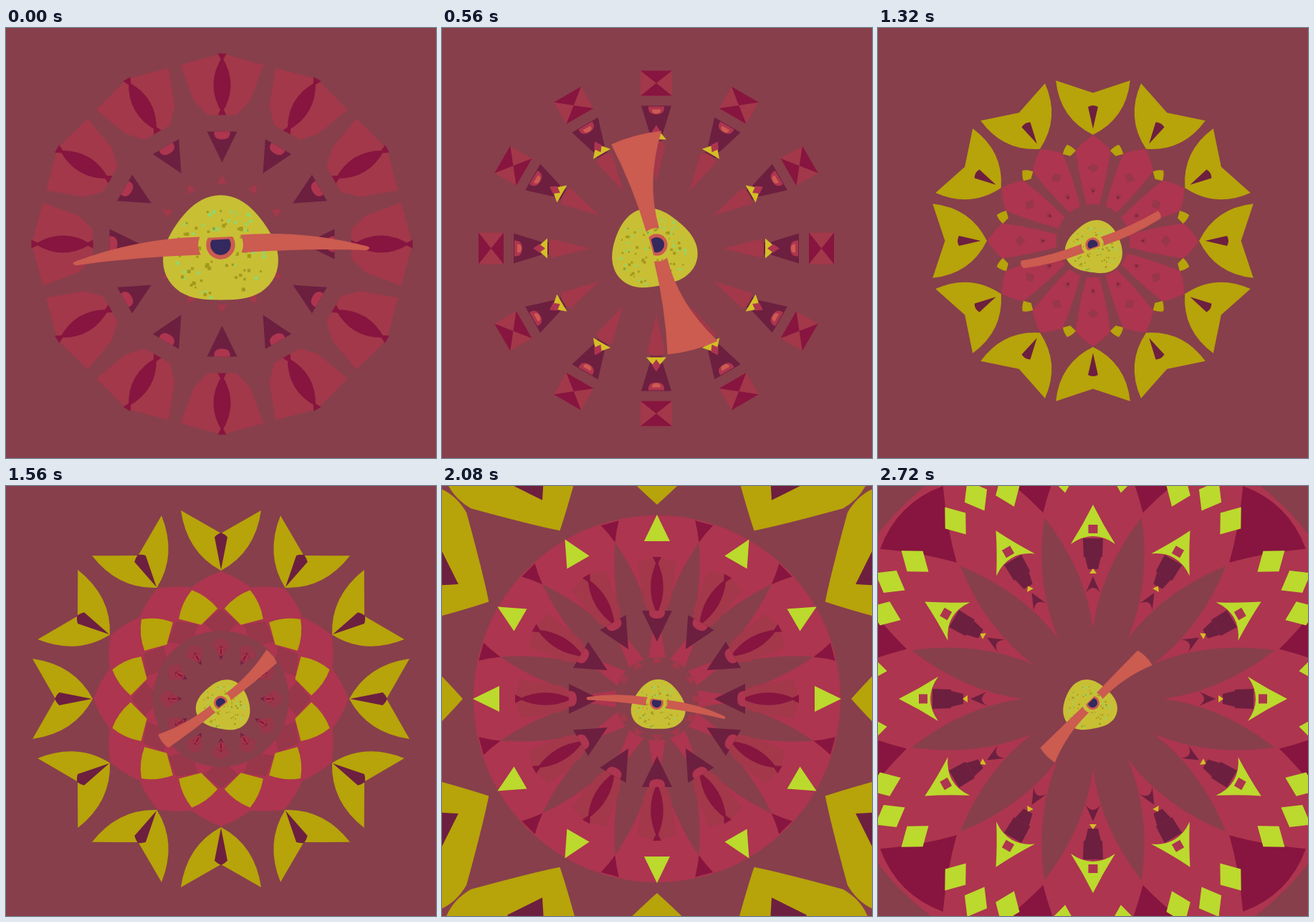
An HTML page with a canvas that plays this animation: 600 px wide and 600 px high, repeating every 2.76 s.

```html
<!DOCTYPE html>
<html lang="en">
<head>
<meta charset="utf-8">
<style>
html, body { margin: 0; width: 100%; height: 100%; overflow: hidden; background: #873f4b; }
canvas { display: block; width: 600px; height: 600px; }
</style>
</head>
<body>
<canvas id="stage" width="600" height="600"></canvas>
<script>
const ctx = document.getElementById('stage').getContext('2d');
const LOOP = 2760, STEP = 40, TAU = Math.PI * 2, DEG = Math.PI / 180;
const BEATS = [0, 560, 1040, 1560, 2080, 2400, 2720];
const C = {
  bg: '#873f4b', rose: '#a2384a', pink: '#ad354f', dusk: '#98364a', wine: '#87153f', plum: '#6d1f40',
  olive: '#b7a30a', gold: '#d3bf25', lime: '#bcd92d', coral: '#cc5b50', navy: '#33295e',
  body: '#c8bf35', moss: '#a39a1c', mint: '#92d66c'
};

let now = 0, center = [300, 297], lens = { pivot: 0, zoom: 1 };

const lerp = (a, b, k) => a + (b - a) * k;
const phase = (from, to) => Math.min(1, Math.max(0, (now - from) / (to - from)));
const hump = (from, top, to) => phase(from, top) * (1 - phase(top, to));
// Value passing through one key point per beat, starting at the given beat.
const beat = (first, ...values) => values.reduce((value, next, i) =>
  i ? lerp(value, next, phase(BEATS[first + i - 1], BEATS[first + i])) : next);

// Scales everything drawn inside around a point on the wedge axis.
function grow(pivot, zoom, drawInside) {
  if (zoom <= 0) return;
  const outer = lens;
  lens = { pivot, zoom };
  drawInside();
  lens = outer;
}

// Half outline of (side, radius) points, alternating anchors and controls, repeated in 12 wedges.
function paint(color, turn, half) {
  const right = half.map(([x, r]) => [x, -r]);
  const left = right.slice(0, -1).reverse().map(([x, y]) => [-x, y]);
  const pts = [...right, ...left];
  ctx.fillStyle = color;
  for (let k = 0; k < 12; k++) {
    ctx.save();
    ctx.translate(...center);
    ctx.rotate((k * 30 + turn) * DEG);
    ctx.translate(0, -lens.pivot);
    ctx.scale(lens.zoom, lens.zoom);
    ctx.translate(0, lens.pivot);
    ctx.beginPath();
    ctx.moveTo(...pts[0]);
    for (let i = 1; i + 1 < pts.length; i += 2) ctx.quadraticCurveTo(...pts[i], ...pts[i + 1]);
    ctx.fill();
    ctx.restore();
  }
}

function poly(color, half, turn = 0) {
  paint(color, turn, half.flatMap((p, i) => {
    const q = half[i + 1];
    return q ? [p, [(p[0] + q[0]) / 2, (p[1] + q[1]) / 2]] : [p];
  }));
}
const tri = (color, base, apex, half, dent = 0, bend = 0, turn = 0) => paint(color, turn,
  [[0, apex], [half * (0.5 + bend), (apex + base) / 2], [half, base], [half / 2, base + dent], [0, base + dent]]);
const kite = (color, inner, outer, half, waist, turn = 0, bulge = 0) => paint(color, turn,
  [[0, outer], [half * (0.5 + bulge), (outer + waist) / 2 + bulge * half], [half, waist],
   [half / 2, (inner + waist) / 2], [0, inner]]);
const block = (color, inner, outer, wIn, wOut) =>
  poly(color, [[0, outer], [wOut, outer], [wIn, inner], [0, inner]]);
const leaf = (color, inner, outer, half) =>
  paint(color, 0, [[0, outer], [half * 2, (inner + outer) / 2], [0, inner]]);
const dome = (color, r, size) =>
  paint(color, 0, [[0, r], [size / 2, r], [size, r], [size * 1.1, r - size], [0, r - size]]);

// Petals fold into squares while the triangles below open into fans.
function bloom(fold, inset, girth) {
  const m = (a, b) => lerp(a, b, fold);
  const open = 1 - fold;
  const far = inset * (1 + open);
  const outer = m(266, 248) - far, inner = m(180, 213) - far + 6 * open * (1 - girth);
  const half = m(58 * girth, 22), mid = (outer + inner) / 2;
  poly(C.rose, [[0, outer], [half, outer - 16 * girth * open], [half * m(0.68, 1), inner + 20 * open],
    [half * m(0.35, 0.9), inner], [0, inner]]);
  leaf(C.wine, lerp(mid, inner + 3, open), lerp(mid, outer - 5, open), 6 * (1 + girth) * open);
  tri(C.wine, outer, m(outer - 12, mid), m(6, 22));
  tri(C.wine, inner, m(inner + 12, mid), m(6, 22));

  const fanTop = m(157, 199) - inset;
  kite(C.rose, m(84, 92) - inset, m(96, 152) - inset, m(7, 13), m(84, 146) - inset);
  block(C.plum, m(114, 160) - inset, fanTop, m(0, 9), 21);
  dome(C.pink, fanTop - fold, 11);
  grow(fanTop - 6, fold, () => dome(C.coral, fanTop - 5, 6));
  grow(160 - inset, fold, () => {
    tri(C.plum, 150 - inset, 164 - inset, 9);
    tri(C.gold, 152 - inset, 168 - inset, 14);
    kite(C.pink, 155 - inset, 172 - inset, 6, 163 - inset);
  });
}

// Small triangles that widen into one round field.
function field() {
  const r = beat(2, 112, 178, 256, 375, 378);
  const spread = beat(2, 5.5, 15.6, 15.6) * DEG, tuck = beat(2, 0.84, 0.9, 1);
  const inner = lerp(92, 0, phase(1040, 1400));
  const x = r * tuck * Math.sin(spread), y = r * tuck * Math.cos(spread);
  grow(102, phase(600, 1040), () => paint(C.pink, 0,
    [[0, r], [r * Math.tan(spread / 2), r * (1 + tuck) / 2], [x, y], [x * 0.7, (y + inner) / 2], [0, inner]]));
}

function cutouts() {
  ctx.fillStyle = C.bg;
  ctx.beginPath();
  ctx.arc(...center, beat(2, 0, 95, 58, 75, 90), 0, TAU);
  ctx.fill();
  const tip = beat(3, 110, 226, 256, 262), w = beat(3, 0, 26, 37);
  paint(C.bg, 15, [[0, tip], [w, tip * 0.67], [w * 0.67, 90], [w * 0.33, 70], [0, 50]]);
  const rim = beat(3, 200, 254, 342, 358);
  tri(C.wine, rim, beat(3, 200, 226, 262, 269), beat(3, 0, 13, 44, 62), rim * 0.04 * phase(2080, 2400), -0.1, 15);
}

function blossoms() {
  const apex = beat(2, 112, 179, 271, 430), corner = beat(2, 178, 263, 360, 560);
  const top = beat(2, 178, 231, 520, 720), half = beat(2, 47, 56, 92, 150);
  grow(160, phase(640, 1040), () => {
    paint(C.olive, 0, [[0, top], [half * beat(3, 0.5, 1.5), (top + corner) / 2], [half, corner],
      [half * beat(2, 0.94, 0.85, 0.33), lerp(apex, corner, 0.3)], [0, apex]]);
    const seed = beat(2, 129, 180, 320, 480), tip = beat(2, 139, 232, 385, 570);
    kite(C.plum, seed, tip, beat(2, 4.5, 9, 30, 40), lerp(seed, tip, beat(2, 1, 0.88, 0.7)), 0, 0.1);
  });
}

function crown() {
  const base = beat(4, 220, 219, 216);
  grow(238, phase(1720, 2080), () =>
    tri(C.lime, base, beat(4, 257, 297, 271), beat(4, 18, 38, 31), beat(4, 0, 6, 11), beat(5, 0, -0.06)));
  grow(237, phase(2440, 2720), () => block(C.pink, 231, 243, 6.5, 6.5));
  const w = beat(5, 12, 18), long = beat(5, 18, 24), turn = beat(5, 6.3, 7.7);
  grow(280, phase(2160, 2400), () => {
    for (const side of [-1, 0, 1]) {
      const r = side ? 314 : beat(5, 322, 327);
      kite(C.lime, r - long, r + long, w, r, side * turn);
    }
  });
}

function houses() {
  grow(200, phase(2400, 2720), () => {
    block(C.plum, 198, 224, 13, 14);
    block(C.plum, 181, 198, 7, 11);
    tri(C.gold, 175, 182, 5);
    tri(C.plum, 148, 171, 10, 7);
  });
}

let seed = 11;
const random = () => (seed = seed * 16807 % 2147483647) / 2147483647;
const specks = Array.from({ length: 95 }, () => {
  const a = random() * TAU, d = Math.sqrt(random()) * 0.86;
  return { x: Math.cos(a) * d, y: Math.sin(a) * d, size: 0.035 + random() * 0.035, color: random() < 0.4 ? C.mint : C.moss };
});

function drawBody(r) {
  const lean = -0.25 * Math.sin(now / 330);
  ctx.fillStyle = C.body;
  ctx.beginPath();
  for (let a = 0; a < TAU; a += TAU / 72) {
    const d = r * (1 + 0.07 * Math.cos(3 * (a - lean)) - 0.04 * Math.cos(2 * a));
    ctx.lineTo(Math.sin(a) * d, -Math.cos(a) * d);
  }
  ctx.fill();
  for (const s of specks) {
    ctx.fillStyle = s.color;
    ctx.fillRect(s.x * r, s.y * r, s.size * r, s.size * r);
  }
}

// Blades droop a little and look widest when they stand upright.
function drawBlade(length, upright) {
  const root = 0.062, tip = 0.012 + 0.24 * upright ** 1.6, drop = 0.075;
  const at = (x, y) => [x * length, y * length];
  ctx.fillStyle = C.coral;
  ctx.beginPath();
  ctx.moveTo(...at(0.14, -root));
  ctx.quadraticCurveTo(...at(0.58, -root - 0.01), ...at(1, drop - tip));
  ctx.quadraticCurveTo(...at(1.04, drop), ...at(1, drop + tip));
  ctx.quadraticCurveTo(...at(0.58, root - 0.01), ...at(0.14, root));
  ctx.quadraticCurveTo(...at(0.17, 0), ...at(0.14, -root));
  ctx.fill();
}

function drawEye(length) {
  const bowl = (color, r) => {
    ctx.fillStyle = color;
    ctx.beginPath();
    ctx.arc(0, 0, r * length, -0.55, Math.PI + 0.55);
    ctx.fill();
  };
  bowl(C.body, 0.125);
  bowl(C.coral, 0.1);
  bowl(C.navy, 0.07);
}

function drawFlyer() {
  const zoom = Math.max(0, 1 - now / 1500) ** 1.4;
  const length = 96 + 107 * zoom;
  const angle = beat(0, 3, 105, 179, 218, 352, 366, 405) * DEG;
  ctx.save();
  ctx.translate(299.5, 302.5);
  ctx.save();
  ctx.translate(-5 * Math.sin(TAU * now / 2240), length * 0.045);
  drawBody(length * 0.375);
  ctx.restore();
  ctx.rotate(-angle);
  for (const side of [1, -1]) {
    ctx.save();
    ctx.scale(side, 1);
    drawBlade(length, Math.abs(Math.sin(angle)));
    ctx.restore();
  }
  drawEye(length);
  ctx.restore();
}

function draw(t) {
  now = t;
  center = [beat(0, 301.5, 299, 300), beat(0, 301.5, 307.5, 297)];
  ctx.fillStyle = C.bg;
  ctx.fillRect(0, 0, 600, 600);
  field();
  const rosette = hump(1200, 1560, 1900);
  grow(100, rosette, () => kite(C.dusk, 84, 125, 24, 106));
  cutouts();
  grow(165, 1 - phase(560, 960), () => bloom(phase(0, 560), 0, 1));
  blossoms();
  grow(130, rosette, () => kite(C.olive, 107, 157, 28, 123, 15, 0.15));
  grow(70, rosette, () => {
    kite(C.dusk, 55, 85, 13, 75, 0, 0.15);
    kite(C.wine, 63, 74, 5, 70);
  });
  const fold = phase(2080, 2400);
  const size = lerp(0.15 * phase(1400, 1560), 1, phase(1560, 2080));
  grow(lerp(50, 200, fold), size * (1 - phase(2400, 2720)), () => bloom(fold, lerp(34, 20, fold), 0.47));
  houses();
  crown();
  drawFlyer();
}

const start = performance.now();
function tick() {
  const t = (performance.now() - start) % LOOP;
  draw(Math.floor(t / STEP) * STEP);
  requestAnimationFrame(tick);
}
tick();
</script>
</body>
</html>
```
